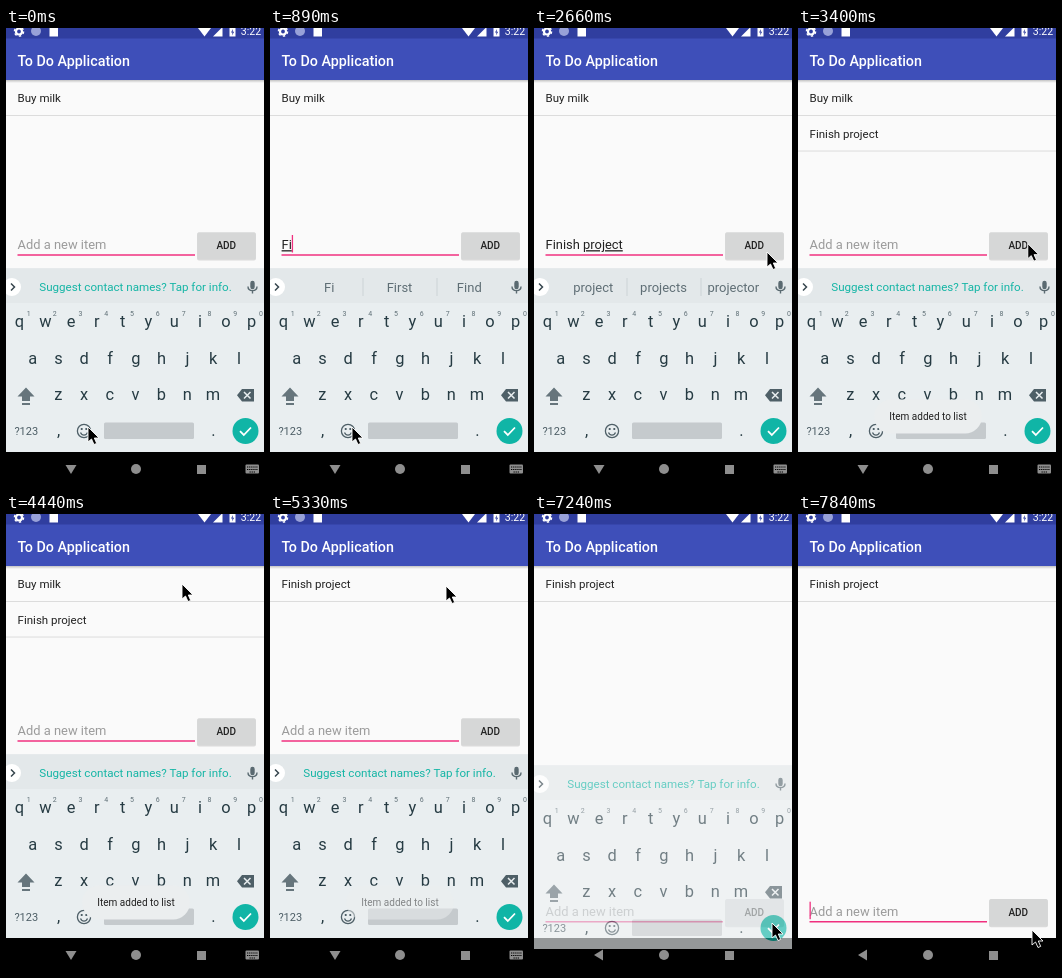
Recreate the animation shown at these times as an HTML page. Size 258 by 458 pixels, loop 7.99 s.

```html
<!DOCTYPE html>
<html lang="en">
<head>
<meta charset="utf-8">
<title>To do list</title>
<style>
html, body { margin: 0; width: 100%; height: 100%; overflow: hidden; background: #fafafa; }
svg { display: block; width: 258px; height: 458px; font-family: Roboto, sans-serif; }
.mid { text-anchor: middle; }
.item { font-size: 11.5px; fill: #212121; }
.entry { font-size: 12.9px; }
.key { font-size: 16.4px; fill: #263b43; }
.hint { font-size: 7px; fill: #5f6f76; }
.word { font-size: 13px; fill: #5f6e75; }
.nav { fill: #8e8e8e; }
</style>
</head>
<body>
<svg viewBox="0 0 258 458" xmlns="http://www.w3.org/2000/svg">
  <defs>
    <linearGradient id="shade" x2="0" y2="1">
      <stop stop-color="#000" stop-opacity=".22"/>
      <stop offset="1" stop-color="#000" stop-opacity="0"/>
    </linearGradient>
  </defs>
  <rect width="258" height="458" fill="#fafafa"/>

  <g id="list">
    <text id="row1" class="item" x="11.6" y="74.3"></text>
    <path d="M0 87.5H258" stroke="#dcdcdc"/>
    <g id="second">
      <text class="item" x="11.6" y="109.8">Finish project</text>
      <path d="M0 123H258" stroke="#dcdcdc"/>
    </g>
  </g>

  <rect y="52" width="258" height="3" fill="url(#shade)"/>
  <rect width="258" height="52" fill="#3e4fb9"/>
  <rect width="258" height="10.5" fill="#303e9f"/>
  <text x="11.6" y="38" font-size="14.3" font-weight="500" fill="#fff">To Do Application</text>
  <g id="status" fill="#fff">
    <circle cx="13" cy="3.5" r="3" fill="none" stroke="#fff" stroke-width="2.2"/>
    <circle cx="13" cy="3.5" r="4.6" fill="none" stroke="#fff" stroke-width="1.4" stroke-dasharray="2.4"/>
    <circle cx="30" cy="3" r="5" fill="#98a1d8"/>
    <path d="M43.5 0H52V8.5H43.5Z"/>
    <path d="M192 0H205L198.500 8.500Z"/>
    <path d="M207 8.500L216.500 -1V8.500Z"/>
    <path d="M223.500 0H229.500V8.500H223.500Z"/>
    <path d="M227 1L225 4.500H226.500L226 7.500L228.200 3.800H226.700Z" fill="#303e9f"/>
    <text x="234.800" y="7.300" font-size="10.5">3:22</text>
  </g>

  <g id="form">
    <text id="hint" class="entry" x="11.6" y="221.200" fill="#9b9b9b">Add a new item</text>
    <text id="entry" class="entry" x="11.6" y="221.200" fill="#212121" xml:space="preserve"><tspan id="done"></tspan><tspan id="typing" text-decoration="underline"></tspan></text>
    <path d="M11.5 227H189" stroke="#f0307f" stroke-width="1.500"/>
    <rect id="caret" y="207" width="1.300" height="17.500" fill="#f0307f"/>
    <rect x="191" y="205" width="59" height="27.500" rx="2" fill="#000" opacity=".13"/>
    <rect id="button" x="191.300" y="204.300" width="58.400" height="26.700" rx="1.500"/>
    <text class="mid" x="220.300" y="221.300" font-size="10" font-weight="500" fill="#212121">ADD</text>
  </g>

  <rect y="424" width="258" height="34"/>
  <g class="nav">
    <path id="down" d="M59.500 437H70.500L65 446Z"/>
    <path id="back" d="M69 435.500V446.500L60 441Z"/>
    <circle cx="130" cy="441" r="5"/>
    <rect x="191" y="437" width="9" height="9"/>
    <g id="switcher">
      <rect x="239.500" y="436.500" width="13.500" height="9" rx="1"/>
      <path d="M241 439H252M241 441.500H252M243.500 444H249.500" stroke="#000" stroke-dasharray="1.300 .8"/>
    </g>
  </g>

  <g id="keyboard">
    <rect y="240" width="258" height="184" fill="#e9eef0"/>
    <rect y="240.500" width="258" height="34.500" fill="#e3e8ea"/>
    <circle cx="6" cy="259" r="9" fill="#fff"/>
    <path d="M5 255.500L8.500 259L5 262.500" fill="none" stroke="#37474f" stroke-width="1.500"/>
    <text id="tip" class="mid" x="129.500" y="263.400" font-size="11.6" fill="#14b5a5">Suggest contact names? Tap for info.</text>
    <g id="words">
      <path d="M93 250V268M167 250V268" stroke="#ccd3d6"/>
      <text class="word mid" x="59.300" y="263.800"></text>
      <text class="word mid" x="129.500" y="263.800"></text>
      <text class="word mid" x="199.300" y="263.800"></text>
    </g>
    <g fill="none" stroke="#5a6a71" stroke-width="1.400">
      <rect x="245" y="253.500" width="3" height="7" rx="1.500" fill="#5a6a71"/>
      <path d="M242 258.500C242 264 251 264 251 258.500M246.500 262.500V265.500"/>
    </g>
    <g id="keys"></g>
    <path d="M20 359.500L28.500 368.500H24V373H16V368.500H11.500ZM16 375H24V377H16Z" fill="#66757c"/>
    <path d="M236 361H248V373.500H236L231 367.200Z" fill="#4e5f67"/>
    <path d="M238 364L244.500 370.500M244.500 364L238 370.500" stroke="#e9eef0" stroke-width="1.500"/>
    <text class="mid" x="20.300" y="406.800" font-size="11" fill="#4c5d65">?123</text>
    <g fill="none" stroke="#4e5f67" stroke-width="1.300">
      <circle cx="78" cy="403" r="6.600"/>
      <path d="M74.500 404.500C76 408 80 408 81.500 404.500"/>
      <path d="M75.700 400V402M80.300 400V402" stroke-width="1.800"/>
    </g>
    <rect x="98" y="394.500" width="90" height="16.500" rx="1.500" fill="#c5cacd"/>
    <circle cx="239.500" cy="403" r="13" fill="#10b5a6"/>
    <path d="M234 403.200L237.800 407L245 399.500" fill="none" stroke="#fff" stroke-width="1.800"/>
  </g>

  <g id="toast">
    <rect x="76" y="371.500" width="108" height="34" rx="17" fill="#ebeeef"/>
    <text class="mid" x="130" y="392.300" font-size="10" fill="#212121">Item added to list</text>
  </g>

  <path id="pointer" d="M0 0V15L3.500 12L6 17.500L8.700 16.400L6.300 11H11Z" stroke="#fff" stroke-width=".9"/>
</svg>
<script>
const $ = id => document.getElementById(id);
const LOOP = 7990, STEP = 147.9, LEAD = 10;

// Each track lists [step, value...]; a value holds until the next entry.
const entry = [
  [0, '', ''], [5, '', 'F', 'F', 'For', 'From'], [6, '', 'Fi', 'Fi', 'First', 'Find'],
  [7, '', 'Fin', 'Fin', 'Find', 'Fine'], [8, '', 'Finis', 'Finish', 'Finished', 'Finis'],
  [9, 'Finish ', '', 'the', 'it', 'my'], [10, 'Finish ', 'pr', 'pr', 'PR', 'probably'],
  [11, 'Finish ', 'proj', 'project', 'projects', 'projector'],
  [12, 'Finish ', 'project', 'project', 'projects', 'projector'], [20, '', '']
];
const toast = [[0, 0], [21, .5], [22, 1], [36, .5], [37, 0]];
const blinks = [3, 16, 19, 23, 26, 29, 33, 36, 39, 43, 46, 49, 52];
const path = [
  [0, 82, 399], [13, 82, 399], [18, 233, 224], [22, 233, 224], [29, 175, 73],
  [30, 176, 70], [33, 176, 70], [35, 176, 72], [38, 176, 72], [41, 219, 247],
  [43, 220, 246], [47, 238, 409], [51, 238, 409], [53, 234, 416]
];

const hold = (track, n) => track.findLast(e => e[0] <= n);
const show = (id, on) => $(id).setAttribute('visibility', on ? 'visible' : 'hidden');
const move = (id, x, y) => $(id).setAttribute('transform', `translate(${x} ${y})`);
const ease = k => k * k * (3 - 2 * k);

function pointerAt(n) {
  const i = path.findIndex(p => p[0] > n);
  if (i < 0) return path.at(-1).slice(1);
  const [a, x, y] = path[i - 1], [b, u, v] = path[i];
  const k = ease((n - a) / (b - a));
  return [x + (u - x) * k, y + (v - y) * k];
}

function buildKeys() {
  const rows = [['qwertyuiop', 13.5, 299], ['asdfghjkl', 26.6, 335.5], ['zxcvbnm', 52.2, 372.2]];
  const key = (c, x, y, cls = 'key') => `<text class="${cls} mid" x="${x}" y="${y}">${c}</text>`;
  let out = key(',', 52.5, 408) + key('.', 207.3, 408);
  rows.forEach(([letters, x0, y], r) => [...letters].forEach((c, i) => {
    const x = x0 + i * 25.8;
    out += key(c, x, y);
    if (!r) out += key((i + 1) % 10, x + 9.3, y - 11.5, 'hint');
  }));
  $('keys').innerHTML = out;
}

const words = document.querySelectorAll('#words text');
let last = -1;

function draw(n) {
  const [, done, typing, ...guesses] = hold(entry, n);
  const text = done + typing, closed = n >= 49;
  $('done').textContent = done;
  $('typing').textContent = typing;
  show('hint', !text);
  show('tip', !guesses.length);
  show('words', guesses.length);
  words.forEach((w, i) => w.textContent = guesses[i] || '');

  show('caret', blinks.filter(b => b <= n).length % 2);
  $('caret').setAttribute('x', 11.5 + (text ? $('entry').getComputedTextLength() : 0));
  $('button').setAttribute('fill', n === 19 ? '#c6c8c8' : '#d6d7d7');
  move('form', 0, closed ? 180.7 : 0);

  $('row1').textContent = n < 34 ? 'Buy milk' : 'Finish project';
  show('second', n >= 20 && n < 34);
  $('toast').setAttribute('opacity', hold(toast, n)[1]);

  move('keyboard', 0, closed ? 11 : 0);
  $('keyboard').setAttribute('opacity', n < 49 ? 1 : n < 50 ? .64 : 0);
  show('down', !closed);
  show('back', closed);
  show('switcher', !closed);
  move('pointer', ...pointerAt(n));
}

function tick() {
  const n = Math.floor((performance.now() % LOOP + LEAD) / STEP);
  if (n !== last) draw(last = n);
  requestAnimationFrame(tick);
}

buildKeys();
tick();
</script>
</body>
</html>
```
